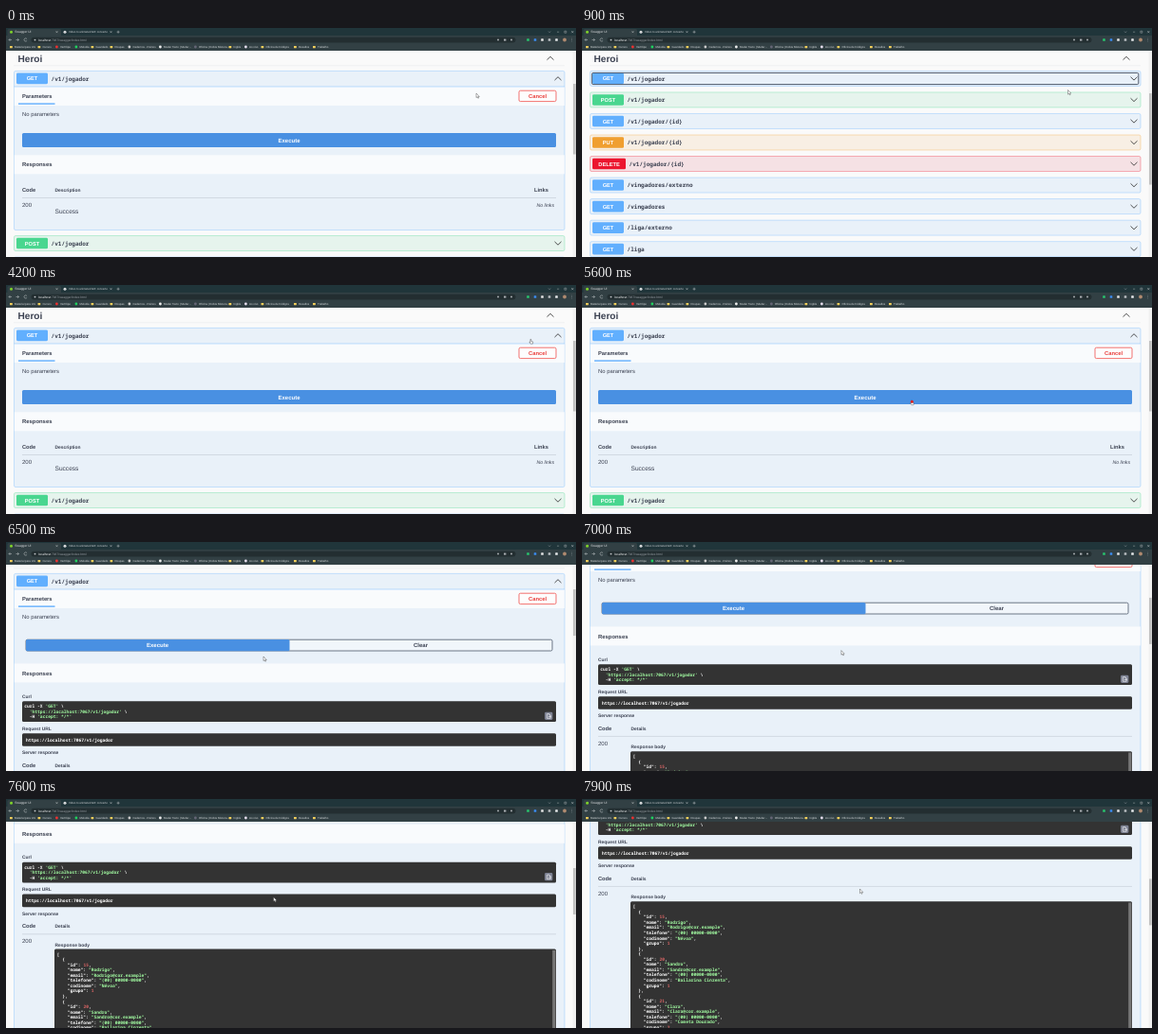
An HTML page for the animation above (8000 ms loop, 600 by 242 pixels).

```html
<!DOCTYPE html>
<html lang="pt">
<head>
<meta charset="utf-8">
<title>Swagger UI</title>
<style>
html, body { margin: 0; width: 100%; height: 100%; overflow: hidden; background: #fafafa; }
svg { display: block; }
text { font-family: "Liberation Sans", Arial, sans-serif; text-rendering: geometricPrecision; white-space: pre; }
.mono { font-family: "Noto Sans Mono", "Liberation Mono", monospace; }
</style>
</head>
<body>
<svg id="stage" width="600" height="242" viewBox="0 0 600 242"></svg>
<script>
const INK = '#3b4151', BLUE = '#61affe', STR = '#a2fca2', NUM = '#d36363';

// Markup helpers; text is placed by its vertical centre.
const rect = (x, y, w, h, fill, extra = '') =>
  `<rect x="${x}" y="${y}" width="${w}" height="${h}" fill="${fill}" ${extra}/>`;
const text = (x, y, size, str, fill = INK, extra = '') =>
  `<text x="${x}" y="${y + size * .36}" font-size="${size}" fill="${fill}" ${extra}>${str}</text>`;
const bold = (x, y, size, str, fill = INK, extra = '') =>
  text(x, y, size, str, fill, 'font-weight="bold" ' + extra);
const mono = (x, y, size, str, fill = INK) => bold(x, y, size, str, fill, 'class="mono"');
const path = (d, stroke, width = .8, fill = 'none') =>
  `<path d="${d}" fill="${fill}" stroke="${stroke}" stroke-width="${width}"/>`;
const dot = (x, y, r, fill) => `<circle cx="${x}" cy="${y}" r="${r}" fill="${fill}"/>`;
const group = (id, body) => `<g id="${id}">${body}</g>`;
const chevron = (x, y, up) => {
  const d = up ? -1.7 : 1.7;
  return path(`M${x - 3.5} ${y - d}L${x} ${y + d}L${x + 3.5} ${y - d}`, '#333', .85);
};
const span = (str, fill) => `<tspan fill="${fill}">${str}</tspan>`;
const CENTER = 'text-anchor="middle"';

const kinds = {
  GET: [BLUE, '#e9f1f9'],
  POST: ['#49d68f', '#e6f4ed'],
  PUT: ['#f09f30', '#f8efe4'],
  DELETE: ['#ec162f', '#f5e1e4']
};
const ops = [
  ['GET', '/v1/jogador'], ['POST', '/v1/jogador'], ['GET', '/v1/jogador/{id}'],
  ['PUT', '/v1/jogador/{id}'], ['DELETE', '/v1/jogador/{id}'],
  ['GET', '/vingadores/externo'], ['GET', '/vingadores'],
  ['GET', '/liga/externo'], ['GET', '/liga']
];

function summary([kind, url], y, open) {
  const w = kind === 'DELETE' ? 35 : 33;
  return rect(11, y - 5.8, w, 11.6, kinds[kind][0], 'rx="1.4"') +
    bold(11 + w / 2, y, 5.7, kind, '#fff', CENTER) +
    mono(w + 14.6, y, 6.05, url) + chevron(581, y, open);
}
const frame = (y, h, [color, bg]) =>
  rect(8.5, y, 579.5, h, bg, `rx="1.6" stroke="${color}" stroke-width=".5" stroke-opacity=".65"`);
function row(op, i) {
  const y = 53.4 + i * 22.53;
  return frame(y - 8, 16, kinds[op[0]]) + summary(op, y, false);
}

// Parts shared by the opened operation before and after execution.
const opened = height =>
  frame(45.4, height, kinds.GET) + summary(ops[0], 53.4, true) +
  rect(8.8, 62, 579, 20, '#f9fbfd') + path('M8.5 62H588', BLUE, .4) +
  bold(17, 72, 5.8, 'Parameters') + rect(13, 79.4, 38.5, 1.4, BLUE) +
  rect(540, 66.2, 39, 11.4, '#fdfdfd', 'rx="1.5" stroke="#f0504c" stroke-width=".8"') +
  bold(559.5, 72, 5.8, 'Cancel', '#ea3f3c', CENTER) +
  text(17, 91.3, 5.9, 'No parameters');
const responses = y => rect(8.8, y - 10, 579, 20, '#f9fbfd') + bold(17, y, 5.9, 'Responses');
const rule = y => path(`M17 ${y}H579`, '#b9c1ca', .5);

const ready = opened(168.1) +
  rect(17, 111, 562, 15, '#4990e2', 'rx="1.5"') + bold(298, 118.5, 6, 'Execute', '#fff', CENTER) +
  responses(144.3) +
  bold(17, 171, 5.7, 'Code') + bold(51.5, 171, 4.9, 'Description') + bold(556, 171, 5.7, 'Links') +
  rule(179.5) + text(17, 187, 6, '200') + text(51.5, 194, 6.6, 'Success') +
  text(577, 187, 5.2, 'No links', INK, 'text-anchor="end" font-style="italic"');

const people = [
  [15, 'Rodrigo', 'Névoa', 1],
  [20, 'Sandro', 'Bailarina Cinzenta', 1],
  [21, 'Clara', 'Cometa Dourado', 2]
];
function json() {
  const lines = [[0, '[']];
  const pair = (key, value, comma = ',') => lines.push([4, `"${key}": ` +
    (typeof value === 'number' ? span(value, NUM) : span(`"${value}"`, STR)) + comma]);
  for (const [id, name, alias, team] of people) {
    lines.push([2, '{']);
    pair('id', id);
    pair('nome', name);
    pair('email', name + '@cor.example');
    pair('telefone', '(00) 00000-0000');
    pair('codinome', alias);
    pair('grupo', team, '');
    lines.push([2, '},']);
  }
  return lines.map(([indent, s], i) =>
    mono(53.6 + indent * 2.78, 277.5 + i * 5.56, 4.63, s, '#fff')).join('');
}
const dark = (x, y, h) => rect(x, y, 579 - x, h, '#333', 'rx="1.5"');
const curl = [
  'curl -X ' + span("'GET'", STR) + ' \\',
  '  ' + span("'https://localhost:7067/v1/jogador'", STR) + ' \\',
  '  -H ' + span("'accept: */*'", STR)
].map((s, i) => mono(19.2, 185.5 + i * 5.5, 4.63, s, '#fff')).join('');

const done = opened(500) +
  rect(21, 115.2, 554, 11.8, '#f1f6fb', 'rx="1.5" stroke="#4b5668" stroke-width=".8"') +
  rect(21, 115, 277.5, 12.2, '#4990e2', 'rx="1.5"') +
  bold(159.5, 121.2, 6, 'Execute', '#fff', CENTER) + bold(436.5, 121.2, 6, 'Clear', INK, CENTER) +
  responses(150.4) +
  bold(17, 175.2, 4.9, 'Curl') + dark(17, 180.3, 21.8) + curl +
  rect(567, 191.7, 8.4, 8.2, '#7d8293', 'rx="1.4"') +
  path('M569.4 193.7h2.6v1.2h1.2v3.4h-3.8zM570.8 196.6h3', '#fff', .6) +
  bold(17, 209, 4.9, 'Request URL') + dark(17, 214.2, 13.6) +
  mono(21, 221.2, 4.63, 'https://localhost:7067/v1/jogador', '#fff') +
  bold(17, 234.7, 4.9, 'Server response') +
  bold(17, 248, 5.7, 'Code') + bold(51.5, 248, 4.9, 'Details') + rule(256.4) +
  text(17, 263.7, 6, '200') + bold(51.5, 267.7, 4.9, 'Response body') +
  dark(51, 272.2, 170) + rect(575.2, 273.5, 3.2, 160, '#777') + json();

const page = group('page',
  bold(12.5, 32, 10.1, 'Heroi') + chevron(573, 32, true) +
  path('M8 39.8H588', '#dfe1e4', .4) +
  group('closed', row(ops[0], 0) +
    rect(10.4, 47.4, 575.4, 12.2, 'none', 'rx="1.4" stroke="#26344a" stroke-width=".8"')) +
  group('ready', ready) + group('done', done) +
  group('rest', ops.slice(1).map((op, i) => row(op, i + 1)).join('')));

// Browser window: [text x, label, icon colour or empty for a folder]
const bookmarks = [
  [9, 'Material para Uni'], [38.5, 'Cursos'], [57, 'VerClipe', '#f03030'], [77.5, 'Melodia', '#1fd35f'],
  [94.5, 'Guardado'], [114.5, 'Roupas'], [133.5, 'Cadernos - Reinos', '#ccc'],
  [166, 'Mudar Texto | Mudar…', '#eee'], [203, 'Oficina | Dobra Mistura…', '#667'], [239.5, 'Inglês'],
  [256, 'Ao vivo', '#e8e0f0'], [273.5, 'Oficina de Códigos'], [308, 'Desafios'], [328, 'Trabalho']
];
const GREY = '#c9cccf', BAR = '#324044';
const cross = (x, y, r) => path(`M${x - r} ${y - r}l${2 * r} ${2 * r}m0 ${-2 * r}l${-2 * r} ${2 * r}`, GREY, .5);
const chrome =
  rect(0, 0, 600, 24, BAR) + rect(0, 0, 600, 8, '#20353a') +
  rect(1.5, 1, 56.5, 8, BAR, 'rx="1.8"') +
  dot(5.5, 4.2, 1.5, '#7fd32a') + text(9.3, 4.2, 3.3, 'Swagger UI', '#e4e6e8') + cross(53.5, 4.2, .9) +
  dot(62, 4.2, 1.5, '#d7d9db') + text(66, 4.2, 2.9, 'Video to animated GIF converte', '#d5d8da') +
  cross(110.5, 4.2, .9) + path('M116.6 4.2h3m-1.5-1.5v3', GREY, .5) +
  path('M571 3.6l1.1 1.1 1.1-1.1M580 4.2h2.2M587.8 3.2h2v2h-2z', GREY, .4) + cross(596.3, 4.2, 1) +
  path('M6 12.5H3m1.4-1.4L3 12.5l1.4 1.4M10.5 12.5h3m-1.4-1.4l1.4 1.4-1.4 1.4M22 11.6a1.6 1.6 0 1 0 .1 1.6', GREY, .5) +
  rect(26.5, 9.7, 510, 5.8, '#232e31', 'rx="2.9"') + dot(30.5, 12.6, .9, GREY) +
  text(34, 12.6, 3.3, span('localhost', '#fff') + ':7067/swagger/index.html', '#9aa0a6') +
  dot(518, 12.6, 1, '#a8adb1') + rect(524, 11.6, 2.4, 2, '#a8adb1') + dot(532, 12.6, 1, '#a8adb1') +
  [[549.5, '#28c76f'], [557, '#3b8cf0'], [564.5, '#e6e6e6'], [572, '#b9bdc1'], [579.5, '#e9ebed']]
    .map(([x, c]) => rect(x - 1.3, 11.2, 2.6, 2.6, c, 'rx=".6"')).join('') +
  dot(588, 12.5, 1.9, '#b08a70') + [11, 12.5, 14].map(y => dot(595.7, y, .35, GREY)).join('') +
  bookmarks.map(([x, label, icon]) =>
    (icon ? dot(x - 3.6, 20, 1.4, icon) : rect(x - 5, 18.9, 2.8, 2.3, '#f3cf5b', 'rx=".4"')) +
    text(x, 20, 2.9, label, '#dcdfe1')).join('');

const cursor = group('cursor',
  group('arrow', path('M0 0V4.6L1.1 3.7L1.9 5.3L2.6 5L1.9 3.5H3.3Z', '#333', .4, '#fff')) +
  group('hand', path('M-.5 0H.4V2L2.3 2.5L2.1 4.7H-.3L-1.5 2.8L-.5 3Z', '#333', .4, '#fff')) +
  group('press', dot(.4, 1.3, 1.5, '#e02020')));

const stage = document.getElementById('stage');
stage.innerHTML = rect(0, 0, 600, 242, '#fafafa') + page + rect(596.6, 24, 3.4, 218, '#f1f1f1') +
  rect(597, 0, 2.7, 10, '#c1c1c1', 'id="thumb"') + chrome + cursor;
const el = id => document.getElementById(id);

const CLOSE = 400, OPEN = 4000, SEND = 5900;
const clicks = [CLOSE, OPEN, 5600];
const mouse = [
  [0, 495, 69], [300, 503, 55], [400, 504, 55], [900, 511.5, 65.5], [1400, 560, 100], [1800, 594, 190],
  [2200, 594, 225], [2700, 591, 110], [3000, 589, 54.5], [3500, 584, 58], [3900, 560, 53], [4100, 558, 53],
  [4600, 530, 75], [5300, 360, 118], [5600, 347, 122], [5900, 346, 122], [6500, 271, 121],
  [7400, 274.5, 109.5], [7900, 292.5, 95]
];
const scrolls = [[0, 0], [6400, 0], [6500, 12], [6600, 23], [7200, 65], [7400, 80], [7900, 164]];

function at(keys, t) {
  const i = keys.findIndex(k => k[0] > t);
  if (i < 0) return keys[keys.length - 1].slice(1);
  const a = keys[i - 1], b = keys[i], p = (t - a[0]) / (b[0] - a[0]);
  return a.slice(1).map((v, j) => v + (b[j + 1] - v) * p);
}
const show = (id, on) => el(id).setAttribute('display', on ? 'inline' : 'none');
const move = (id, x, y) => el(id).setAttribute('transform', `translate(${x} ${y})`);

function draw(now) {
  const t = Math.floor(now % 8000 / 100) * 100;
  const state = t >= SEND ? 'done' : t >= CLOSE && t < OPEN ? 'closed' : 'ready';
  for (const id of ['closed', 'ready', 'done']) show(id, id === state);
  show('rest', state !== 'done');
  move('rest', 0, state === 'ready' ? 151.6 : 0);

  const [scroll] = at(scrolls, t);
  move('page', 0, -scroll);
  const total = { closed: 488, ready: 632, done: 961 }[state];
  el('thumb').setAttribute('y', 25 + (99 + scroll) * 217 / total);
  el('thumb').setAttribute('height', 217 * 217 / total);

  const [x, y] = at(mouse, t);
  const onRow = state === 'closed' && x < 588 && Math.abs((y - 53.4 + 11.26) % 22.53 - 11.26) < 8;
  const onHead = state !== 'closed' && y > 45 && y < 62;
  const onButton = state !== 'closed' && y > 111 - scroll && y < 127 - scroll;
  const hand = onRow || onHead || onButton;
  move('cursor', x, y);
  show('hand', hand);
  show('arrow', !hand);
  show('press', clicks.includes(t));
}
const start = performance.now();
function tick() {
  draw(performance.now() - start);
  requestAnimationFrame(tick);
}
tick();
</script>
</body>
</html>
```
